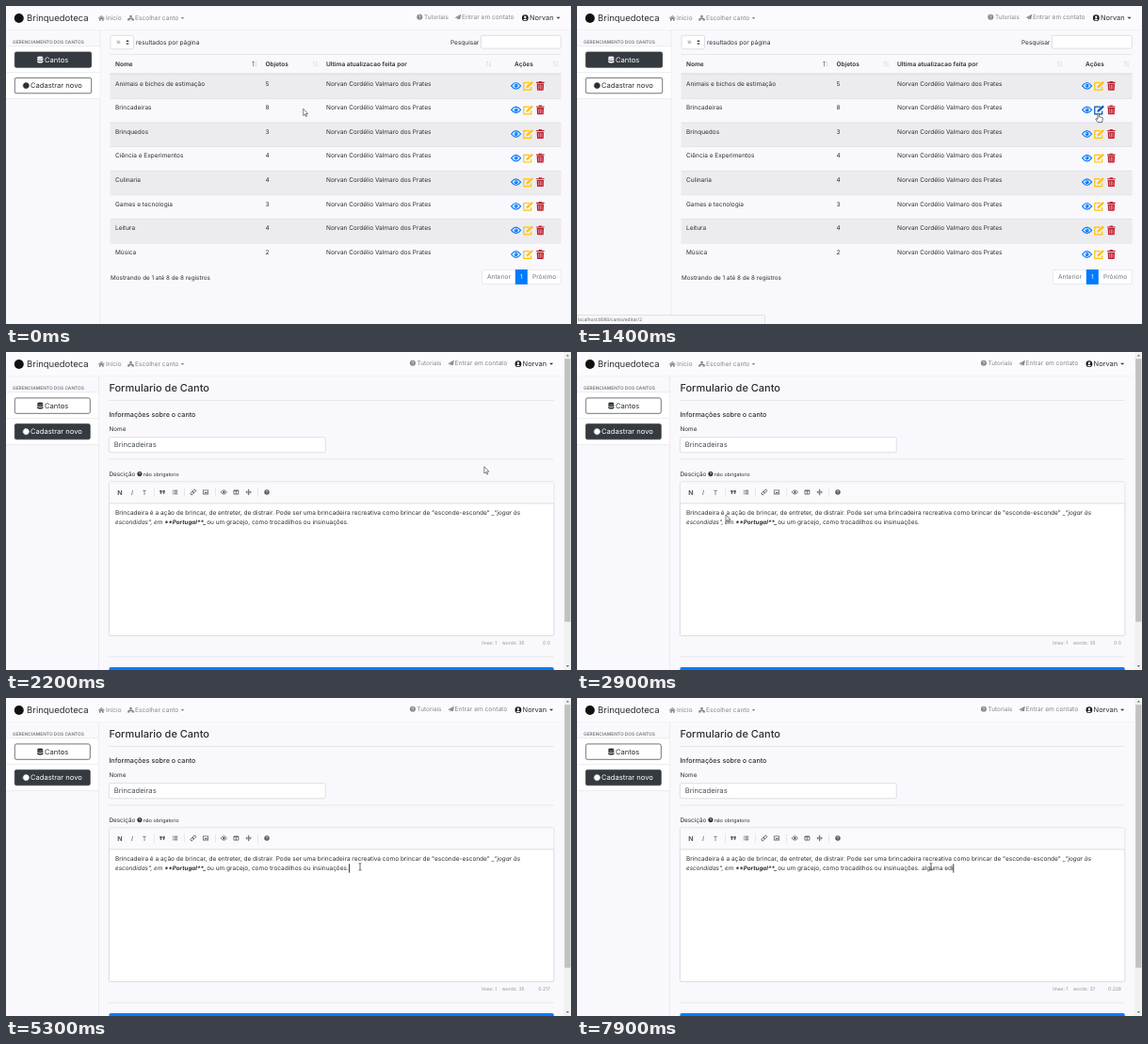
These frames come from a looping animation (600 by 338 pixels, 8 s). An HTML page:

```html
<!DOCTYPE html>
<html lang="pt">
<head>
<meta charset="utf-8">
<title>Brinquedoteca</title>
<style>
  html, body { margin: 0; width: 100%; height: 100%; overflow: hidden; background: #f9f8fc; }
  svg { display: block; width: 600px; height: 338px; }
  text { font-family: Inter, sans-serif; text-rendering: geometricPrecision; white-space: pre; }
</style>
</head>
<body>
<svg id="stage" viewBox="0 0 600 338">
  <defs>
    <g id="eye"><path d="M-5 0Q0-6.6 5 0Q0 6.6-5 0Z" fill="none" stroke="currentColor" stroke-width="1.2"/><circle r="2" fill="currentColor"/><circle cx="-.7" cy="-.7" r=".6" fill="#fff"/></g>
    <g id="edit" fill="none" stroke="currentColor"><path d="M1.2-3.3H-4.9V4.4H3V1.2" stroke-width="1.2"/><path d="M-1.6 1.6L4.4-4" stroke-width="2.3"/><path d="M-2.5 2.5L-1-.2L.3 1.2Z" fill="currentColor" stroke="none"/></g>
    <g id="trash" fill="currentColor"><path d="M-4.3-4H-1.9L-1.4-4.9H1.4L1.9-4H4.3V-2.9H-4.3Z"/><path d="M-3.7-2.3H3.7L3.4 4.3Q3.3 4.9 2.7 4.9H-2.7Q-3.3 4.9-3.4 4.3Z"/><path d="M-1.7-1.1V3.7M0-1.1V3.7M1.7-1.1V3.7" stroke="#f4e4e7" stroke-width=".55"/></g>
    <g id="db" fill="currentColor"><ellipse cy="-2.3" rx="3.1" ry="1.3"/><path d="M-3.1-1.5Q0 .3 3.1-1.5V.2Q0 2-3.1 .2ZM-3.1 1Q0 2.8 3.1 1V2.6Q0 4.4-3.1 2.6Z"/></g>
    <g id="badge"><circle r="2.9" fill="currentColor"/><circle r="3.1" fill="none" stroke="currentColor" stroke-dasharray="1.1 .52"/></g>
    <g id="home" fill="currentColor"><path d="M-3.6 .2L0-2.9L3.6 .2L3 .8L0-1.7L-3 .8Z"/><path d="M-2.4 .8L0-1.2L2.4 .8V3H.7V1.2H-.7V3H-2.4Z"/></g>
    <g id="people" fill="currentColor"><circle cy="-1.7" r="1.3"/><path d="M-3.4 2.8V1L-1.5-.3H1.5L3.4 1V2.8H1V1.3H-1V2.8Z"/></g>
    <g id="help"><circle r="3" fill="currentColor"/><path d="M-1-.7Q-.8-1.8 .2-1.7Q1.5-1.3 .7-.3Q0 .1 0 .6M0 1.2V1.9" fill="none" stroke="#fff" stroke-width=".7"/></g>
    <path id="plane" d="M-3.2 .5L3.2-3.1L2.2 2.5L0 1.7L-1 3V1.2L1.9-1.6L-1.7 1.1Z" fill="currentColor"/>
    <g id="user"><circle r="3.4" fill="currentColor"/><circle cy="-.9" r="1.2" fill="#fff"/><path d="M-2 2Q0-.4 2 2Q0 3.2-2 2Z" fill="#fff"/></g>
    <path id="sort" d="M0 2.8V-2.6M-1.2-1.4L0-2.6L1.2-1.4" fill="none" stroke="currentColor" stroke-width=".6"/>
    <path id="quote" d="M-3-2.3H-.5V0L-1.5 2.3H-2.8L-2 .3H-3ZM.5-2.3H3V0L2 2.3H.7L1.5 .3H.5Z" fill="currentColor"/>
    <path id="list" d="M-3-2H-2M-1.2-2H3M-3 0H-2M-1.2 0H3M-3 2H-2M-1.2 2H3" stroke="currentColor" stroke-width="1"/>
    <g id="link" fill="none" stroke="currentColor" stroke-width="1" transform="rotate(-45)"><rect x="-3.8" y="-1.3" width="4" height="2.6" rx="1.3"/><rect x="-.2" y="-1.3" width="4" height="2.6" rx="1.3"/></g>
    <g id="image" fill="none" stroke="currentColor" stroke-width=".8"><rect x="-3" y="-2.3" width="6" height="4.6"/><path d="M-2 1.5L-.6-.2L.2 .6L1.2-.7L2.2 1.5Z" fill="currentColor" stroke="none"/></g>
    <path id="columns" d="M-2.7-2.2H2.7V2.3H-2.7ZM0-2V2.3M-2.7-1.7H2.7" fill="none" stroke="currentColor" stroke-width=".9"/>
    <path id="move" d="M-3 0H3M0-3V3M-2-1L-3 0L-2 1M2-1L3 0L2 1M-1-2L0-3L1-2M-1 2L0 3L1 2" fill="none" stroke="currentColor" stroke-width=".9"/>
    <path id="arrow" d="M0 0V7.2L1.7 5.7L2.8 8.3L3.9 7.8L2.8 5.3H5Z" fill="#fff" stroke="#333" stroke-width=".6"/>
    <path id="hand" d="M-.8 .8Q0-.6 .8 .8V4L4 4.7Q4.7 5 4.5 6L3.8 9.8H-.7L-3 6.4Q-2.6 5.2-.8 6.6Z" fill="#fff" stroke="#333" stroke-width=".7"/>
    <path id="beam" d="M-1.4-3.6H-.4L0-3.2L.4-3.6H1.4M0-3.2V3.2M-1.4 3.6H-.4L0 3.2L.4 3.6H1.4" fill="none" stroke="#222" stroke-width=".7"/>
  </defs>
</svg>
<script>
const LOOP = 8000, BLUE = '#007bff', DARK = '#343a40', INK = '#2b2f33', LINE = '#dfdfe4', GRAY = '#85858a';
const stage = document.getElementById('stage');

const rect = (x, y, w, h, fill, stroke = 'none', r = 0) =>
  `<rect x="${x}" y="${y}" width="${w}" height="${h}" fill="${fill}" stroke="${stroke}" stroke-width=".7" rx="${r}"/>`;
const text = (x, y, size, str, attrs = '') =>
  `<text x="${x}" y="${y}" font-size="${size}" fill="${INK}" ${attrs}>${str}</text>`;
const tint = c => ` style="fill:${c}"`;
const icon = (id, x, y, color, s = 1) =>
  `<use href="#${id}" transform="translate(${x} ${y}) scale(${s})" color="${color}"/>`;
const path = (d, fill) => `<path d="${d}" fill="${fill}"/>`;
const down = (x, y, c, s = 1) => path(`M${x - 2 * s} ${y - s}h${4 * s}l${-2 * s} ${2 * s}z`, c);
const up = (x, y, c, s = 1) => path(`M${x - 2 * s} ${y + s}h${4 * s}l${-2 * s} ${-2 * s}z`, c);
const rule = (x, y, w, c = LINE) => rect(x, y, w, .7, c);
const bold = 'font-weight="600"', medium = 'font-weight="500"', middle = 'text-anchor="middle"';

function frame(dx, edge, onForm) {
  const button = (y, name, mark, x, tx, on) => {
    const c = on ? '#fff' : INK;
    return rect(9.3, y, edge - 18.6, 16.4, on ? DARK : '#fff', DARK, 1.8) +
      icon(mark, x, y + 8.2, c) + text(tx, y + 10.9, 7.6, name, tint(c));
  };
  return rect(0, 0, 600, 338, '#f9f8fc') + rect(0, 0, 600, 25.5, '#fbfbfd') +
    rect(0, 25, 600, .6, '#f0eff4') + rect(edge - .4, 25.5, .7, 312.5, '#e6e5ea') +
    rect(0, 42.5, edge - .4, 56, '#fff') +
    [42.5, 70.4, 98.4].map(y => rule(0, y, edge - .4, '#e4e4e8')).join('') +
    `<circle cx="13.8" cy="13" r="5" fill="#111"/>` +
    text(22, 16.2, 9.5, 'Brinquedoteca') +
    icon('home', 101.3, 12.8, GRAY) + text(106, 15.1, 6.6, 'Início', tint(GRAY)) +
    icon('people', 132.5, 12.8, GRAY) + text(137, 15.1, 6.6, 'Escolher canto', tint(GRAY)) +
    down(187.5, 13, GRAY, .9) +
    icon('help', 439.3 + dx, 11.8, GRAY) + text(444 + dx, 14, 6.4, 'Tutoriais', tint(GRAY)) +
    icon('plane', 480 + dx, 11.8, GRAY) + text(484 + dx, 14, 6.6, 'Entrar em contato', tint(GRAY)) +
    icon('user', 551.3 + dx, 12.7, '#1b1b1d') + text(556 + dx, 15.2, 7.4, 'Norvan') +
    down(586.5 + dx, 12.8, INK) +
    text(7, 40, 4.85, 'GERENCIAMENTO DOS CANTOS', bold + tint('#77777c')) +
    button(48.9, 'Cantos', 'db', 36.3, 41, !onForm) +
    button(76.4, 'Cadastrar novo', 'badge', 21.3, 26, onForm);
}

const rows = [['Animais e bichos de estimação', 5], ['Brincadeiras', 8], ['Brinquedos', 3],
  ['Ciência e Experimentos', 4], ['Culinaria', 4], ['Games e tecnologia', 3], ['Leitura', 4], ['Música', 2]];

function listPage() {
  const pale = '#d2d2d7';
  const sort = (x, c) => icon('sort', x, 61.5, c) + icon('sort', x + 3, 61.5, pale, -1);
  const head = [[116, 'Nome'], [275.5, 'Objetos'], [340, 'Ultima atualizacao feita por'], [540, 'Ações']];
  const body = rows.map(([name, n], i) => {
    const y = 72.5 + 25.6 * i, base = y + 12.1, mid = y + 12.3;
    return (i % 2 ? '' : rect(110.5, y, 479, 25.6, '#ececef')) + rule(110.5, y, 479) +
      text(116, base, 6.5, name) + text(275.5, base, 6.5, n) +
      text(340, base, 6.5, 'Norvan Cordélio Valmaro dos Prates') +
      icon('eye', 541.6, mid, BLUE) +
      `<g ${i === 1 ? 'id="target"' : ''} color="#ffc107"><use href="#edit" x="554.7" y="${mid}"/></g>` +
      icon('trash', 567.4, mid, '#bd2130');
  }).join('');
  return frame(0, 100, false) +
    rect(111, 31.3, 24.5, 14.4, '#fff', '#ced4da', 1.8) + text(117, 40.2, 4.4, '10', tint('#666')) +
    up(129, 37, '#333', .9) + down(129, 40.4, '#333', .9) +
    text(138, 40.5, 6.55, 'resultados por página') + text(472, 40.5, 6.5, 'Pesquisar') +
    rect(504.4, 31.3, 84.8, 13.8, '#fff', '#ced4da', 1.8) +
    rule(110.5, 51, 479) + head.map(([x, s]) => text(x, 63.9, 6.5, s, bold)).join('') +
    sort(262.5, '#55555a') + [327, 511, 582].map(x => sort(x, pale)).join('') +
    rect(110.5, 71.4, 479, 1.2, '#dcdce1') + body +
    text(111, 291.4, 6.35, 'Mostrando de 1 até 8 de 8 registros') +
    rect(505.4, 280.4, 83.8, 15.2, '#fff', '#dee2e6', 1.8) + rect(540.8, 280.1, 13, 15.8, BLUE) +
    text(511, 290.4, 6.6, 'Anterior', tint('#6c757d')) + text(559, 290.4, 6.6, 'Próximo', tint('#6c757d')) +
    text(547.3, 290.4, 6.5, '1', middle + tint('#fff'));
}

function formTop(x, w, inputW) {
  return text(x, 41.6, 11, 'Formulario de Canto', medium) + rule(x, 51.2, w) +
    text(x, 68.6, 7.2, 'Informações sobre o canto', medium) +
    text(x, 84.2, 6.4, 'Nome') +
    rect(x, 90.6, inputW, 16.2, '#fff', '#ced4da', 1.8) +
    text(x + 5.3, 101.4, 7.6, 'Brincadeiras', tint('#495057')) + rule(x, 113.6, w);
}
const label = (x, y) => text(x, y, 6.4, 'Descição') + icon('help', x + 32.5, y - 2, INK, .85) +
  text(x + 36.3, y, 5.3, 'não obrigatorio');

function plainForm() {
  return frame(0, 100, true) + formTop(110.7, 478.6, 232.6) + label(110.7, 146) +
    rect(186.5, 125.3, 71.8, 20.5, '#fff', '#858589') + rect(250, 125.8, 7.8, 19.5, '#f1f1f1') +
    up(254, 130, '#777', .8) + down(254, 135, '#777', .8) + rect(250, 138.5, 7.8, 6.8, '#d5d5d8') +
    `<path d="M251 145L257.5 139M254 145L257.5 142" stroke="#888" stroke-width=".6"/>` +
    text(188, 133, 6.5, 'Brincadeira é a') + text(188, 142.5, 6.5, 'ação de brincar, de') +
    rule(110.7, 159.4, 478.6) + rect(110.7, 170.3, 478.6, 21, BLUE, 'none', 2.2) +
    text(350, 184.2, 9.4, 'Salvar', middle + tint('#fff'));
}

function editorPage() {
  const c = '#55595c', faint = tint('#959694');
  const tools = [['quote', 166], ['list', 179.5], ['link', 198.8], ['image', 212], ['eye', 231.3],
    ['columns', 244.4], ['move', 257.6], ['help', 277]];
  return frame(-7.4, 98.6, true) + formTop(109.4, 472.4, 229.8) + label(109.4, 131.6) +
    rect(109.4, 138, 472.4, 163.6, '#fff', '#cfcfd4', 1.8) +
    rect(109.8, 138.4, 471.6, 22.4, '#faf9fc') + rule(109.4, 160.6, 472.4, '#cfcfd4') +
    text(121, 151.6, 7, 'N', middle + ' font-weight="700"' + tint(c)) +
    text(134, 151.6, 7, 'I', middle + ' font-style="italic"' + tint(c)) +
    text(147, 151.6, 7, 'T', middle + tint(c)) +
    [157, 189, 222, 267].map(x => rect(x, 144.3, .6, 9.4, '#dddde1')).join('') +
    tools.map(([id, x]) => icon(id, x, 149, c, id === 'eye' ? .65 : .9)).join('') +
    text(116, 173.3, 6.5, 'Brincadeira é a ação de brincar, de entreter, de distrair. Pode ser uma brincadeira recreativa como brincar de "esconde-esconde"') +
    text(515.5, 173.3, 6.4, '_<tspan font-style="italic">"jogar às</tspan>') +
    text(116, 182.7, 6.4, 'escondidas", em', 'font-style="italic"') +
    text(168.3, 182.7, 6.25, '**Portugal**_', 'font-style="italic" font-weight="700"') +
    text(213.2, 182.7, 6.5, 'ou um gracejo, como trocadilhos ou insinuações.') +
    text(364.2, 182.7, 6.5, '', 'id="typed"') + '<rect id="caret" y="176.3" width=".8" height="9.4" fill="#111"/>' +
    text(505.3, 311.2, 5.1, 'lines: 1', faint) +
    text(526.8, 311.2, 5.1, '', 'id="words"' + faint) +
    text(578, 311.2, 5.1, '', 'id="pos" text-anchor="end"' + faint) +
    rule(109.4, 323.6, 472.4) + rect(109.4, 335, 472.4, 8, BLUE, 'none', 2) +
    rect(592.6, 0, 7.4, 338, '#f1f1f1') + rect(593.2, 7.2, 6.2, 279.5, '#c1c1c1') +
    up(596.4, 3.6, '#666', .8) + down(596.4, 334, '#444', .8);
}

const status = rect(-1, 328.6, 200.5, 11, '#f8f8f9', '#d9d9dc', 1) +
  text(1, 335.4, 4.95, 'localhost:8080/canto/editar/2', 'style="font-family:\'Open Sans\',sans-serif;fill:#5c5c60"');

stage.insertAdjacentHTML('beforeend',
  `<g id="list-page">${listPage()}</g><g id="plain">${plainForm()}</g><g id="editor">${editorPage()}</g>` +
  `<g id="status">${status}</g><use id="cursor"/>`);
const $ = id => document.getElementById(id);
const show = (id, on) => $(id).setAttribute('visibility', on ? 'visible' : 'hidden');

// time, x, y of the pointer's hot spot
const track = [[0, 315.7, 109.2], [300, 315.7, 109.2], [700, 425, 128], [1200, 553.4, 113], [1400, 553.8, 113.8],
  [2100, 553.8, 113.8], [2500, 370, 146], [2900, 158, 173], [3100, 235, 182], [3400, 485, 194],
  [3800, 372, 184], [4000, 376, 179.4], [LOOP, 376, 179.4]];
const shapes = [[0, 'arrow'], [1200, 'hand'], [2200, 'arrow'], [3000, 'beam']];
const keys = [[5400, ' '], [5900, 'a'], [6100, 'l'], [6200, 'g'], [6300, 'u'], [6500, 'm'], [6600, 'a'],
  [6800, ' '], [6900, 'e'], [7000, 'd'], [7900, 'i']];
const CLICK = 4300;

function pointAt(t) {
  const i = track.findIndex(p => p[0] > t);
  const [a, x, y] = track[i - 1], [b, u, v] = track[i];
  const k = (t - a) / (b - a);
  return [x + (u - x) * k, y + (v - y) * k];
}

function draw(t) {
  show('list-page', t < 2100);
  show('plain', t >= 2100 && t < 2200);
  show('editor', t >= 2200);
  show('status', t >= 1400 && t < 2200);
  $('target').setAttribute('color', t >= 1200 ? '#0056b3' : '#ffc107');

  const [x, y] = pointAt(t);
  $('cursor').setAttribute('href', '#' + shapes.filter(s => s[0] <= t).pop()[1]);
  $('cursor').setAttribute('transform', `translate(${x} ${y})`);

  const done = keys.filter(k => k[0] <= t), n = done.length;
  const typed = $('typed');
  typed.textContent = done.map(k => k[1]).join('').replace(/ /g, '\u00a0');
  $('caret').setAttribute('x', 364 + (n ? typed.getComputedTextLength() : 0));
  const since = n ? done[n - 1][0] + 60 : CLICK;
  show('caret', t >= CLICK && Math.floor(Math.max(0, t - since) / 500) % 2 === 0);
  $('words').textContent = 'words: ' + (35 + (n > 1) + (n > 8));
  $('pos').textContent = '0:' + (t < CLICK ? 0 : 217 + n);
}

let last = -1;
function tick() {
  const t = Math.floor(performance.now() % LOOP / 100) * 100;
  if (t !== last) draw(last = t);
  requestAnimationFrame(tick);
}
tick();
</script>
</body>
</html>
```
